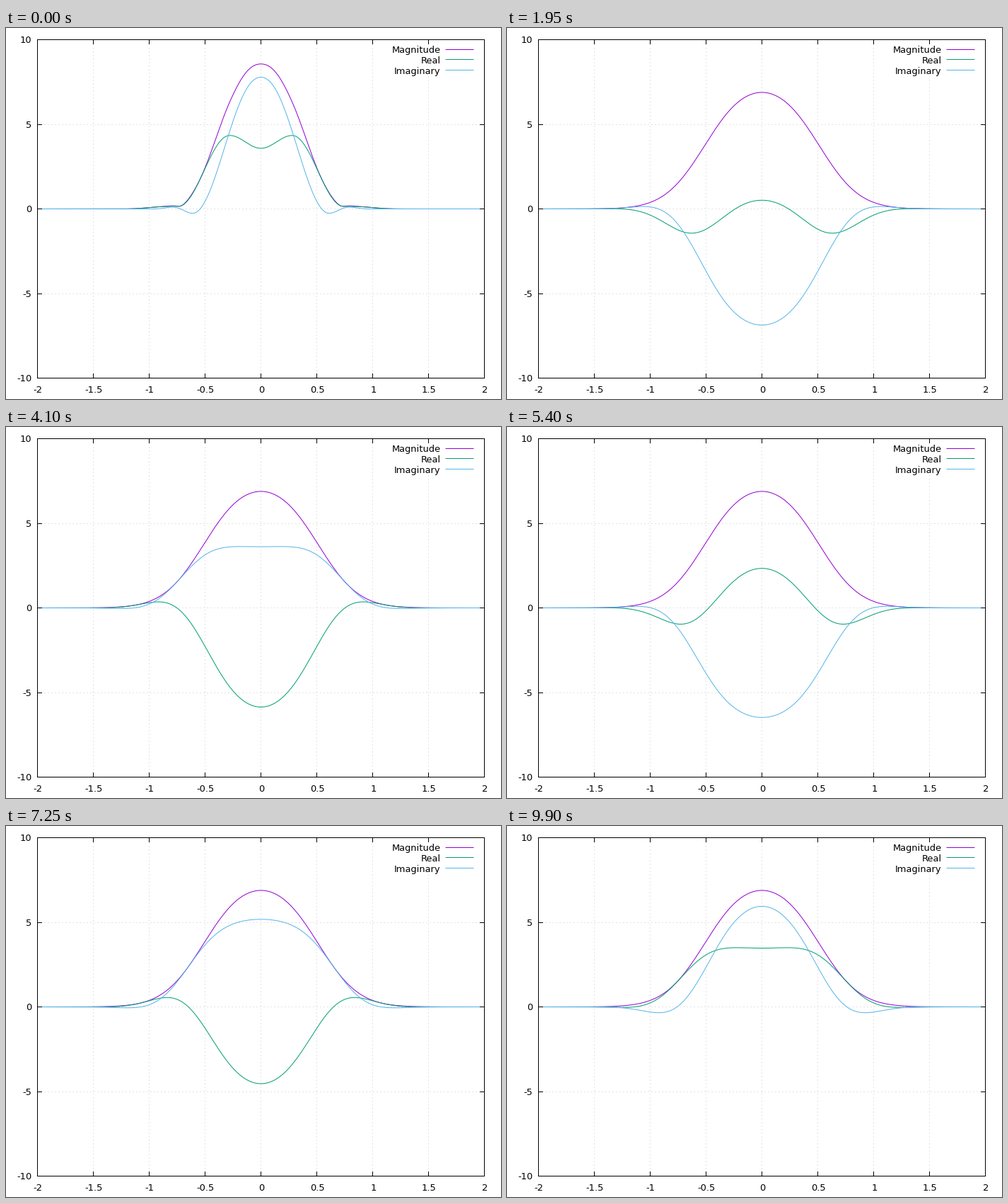
These frames come from a looping animation (700x524 px, 9950 ms). A matplotlib script:

```python
import numpy as np
import matplotlib.pyplot as plt
from matplotlib.animation import FuncAnimation

W, H, DPI = 700, 524, 100
PX = 72 / DPI  # one pixel in points
LEFT, RIGHT, TOP, BOTTOM = 44.5, 676.5, 16.5, 494.5
TICK = 6
FRAMES, INTERVAL = 199, 50
SPIN = np.radians(5.443)   # phase advance per frame
START = np.radians(62)     # phase of the settled pulse at time zero
CHIRP = 0.677              # phase lag per neper of amplitude
SETTLE = 4.0               # decay time of the initial shape, in frames
CURVES = [("Magnitude", "#9400d3"), ("Real", "#009e73"), ("Imaginary", "#56b4e9")]

plt.rcParams["font.family"] = "DejaVu Sans"


def to_x(v):
    return LEFT + (v + 2) * (RIGHT - LEFT) / 4


def to_y(v):
    return BOTTOM - (v + 10) * (BOTTOM - TOP) / 20


def ease(x, x0, x1, y0, y1, bend=1.0):
    """Raised-cosine step from (x0, y0) to (x1, y1)."""
    t = np.clip((x - x0) / (x1 - x0), 0, 1) ** bend
    return y0 + (y1 - y0) * (1 - np.cos(np.pi * t)) / 2


def settled_pulse(x):
    """Chirped pulse whose phase lag follows its log amplitude."""
    nepers = x**2 * (3.05 - 1.25 * np.exp(-(x / 0.7) ** 2))
    return 6.885 * np.exp(-nepers + 1j * (START - CHIRP * nepers))


def first_pulse(x):
    """Double hump (real) and single hump (imaginary) with small ripples."""
    shelf = np.maximum(x - 0.74, 0)
    re = np.where(x < 0.28, ease(x, 0, 0.28, 3.58, 4.34), ease(x, 0.28, 0.74, 4.34, 0.15))
    re = re * np.exp(-(shelf / 0.3) ** 3)
    ripple = np.maximum(x - 0.61, 0)
    im = ease(x, 0, 0.61, 7.78, -0.26, 1.07)
    im = im * np.exp(-23 * ripple**2) * np.cos(14.3 * ripple)
    return re + 1j * im


fig = plt.figure(figsize=(W / DPI, H / DPI), dpi=DPI, facecolor="white")
ax = fig.add_axes([0, 0, 1, 1])
ax.set_xlim(0, W)
ax.set_ylim(H, 0)
ax.axis("off")


def line(xs, ys, color="black", **kw):
    # Coordinates already sit on pixel centres, so no snapping.
    return ax.plot(xs, ys, color=color, lw=PX, snap=False, **kw)[0]


def label(x, y, s, ha):
    ax.text(x, y, s, ha=ha, va="baseline", fontsize=13 * PX, color="black")


DOTS = dict(color="#c8c8c8", ls=(0, (1, 4)), dash_capstyle="butt", zorder=1)

for v in np.arange(-2, 2.1, 0.5):
    x = np.floor(to_x(v)) + 0.5
    if abs(v) < 2:
        # The grid line under the key stops below it.
        line([x, x], [BOTTOM, 68 if v == 1.5 else TOP], **DOTS)
    line([x, x], [BOTTOM, BOTTOM - TICK], zorder=5)
    line([x, x], [TOP, TOP + TICK], zorder=5)
    label(x + 0.8, 515, f"{v:g}", "center")

for v in range(-10, 11, 5):
    y = np.floor(to_y(v)) + 0.5
    if abs(v) < 10:
        line([LEFT, RIGHT], [y, y], **DOTS)
    line([LEFT, LEFT + TICK], [y, y], zorder=5)
    line([RIGHT, RIGHT - TICK], [y, y], zorder=5)
    label(36.5, y + 4.5, str(v), "right")

line([LEFT, RIGHT, RIGHT, LEFT, LEFT], [TOP, TOP, BOTTOM, BOTTOM, TOP],
     solid_joinstyle="miter", zorder=5)

for i, (name, color) in enumerate(CURVES):
    y = np.floor(30 + 14.7 * i) + 0.5
    line([622, 661], [y, y], color)
    label(614.5, 35 + 15 * i, name, "right")

grid = np.linspace(-2, 2, 501)
final = settled_pulse(np.abs(grid))
extra = first_pulse(np.abs(grid)) - final
plots = [line(to_x(grid), to_y(0 * grid), color, zorder=3) for _, color in CURVES]


def draw(k):
    field = (final + extra * np.exp(-k / SETTLE)) * np.exp(1j * SPIN * k)
    for plot, values in zip(plots, (np.abs(field), field.real, field.imag)):
        plot.set_ydata(to_y(values))
    return plots


anim = FuncAnimation(fig, draw, frames=FRAMES, interval=INTERVAL, repeat=True,
                     repeat_delay=0, blit=False)
plt.show()
```
